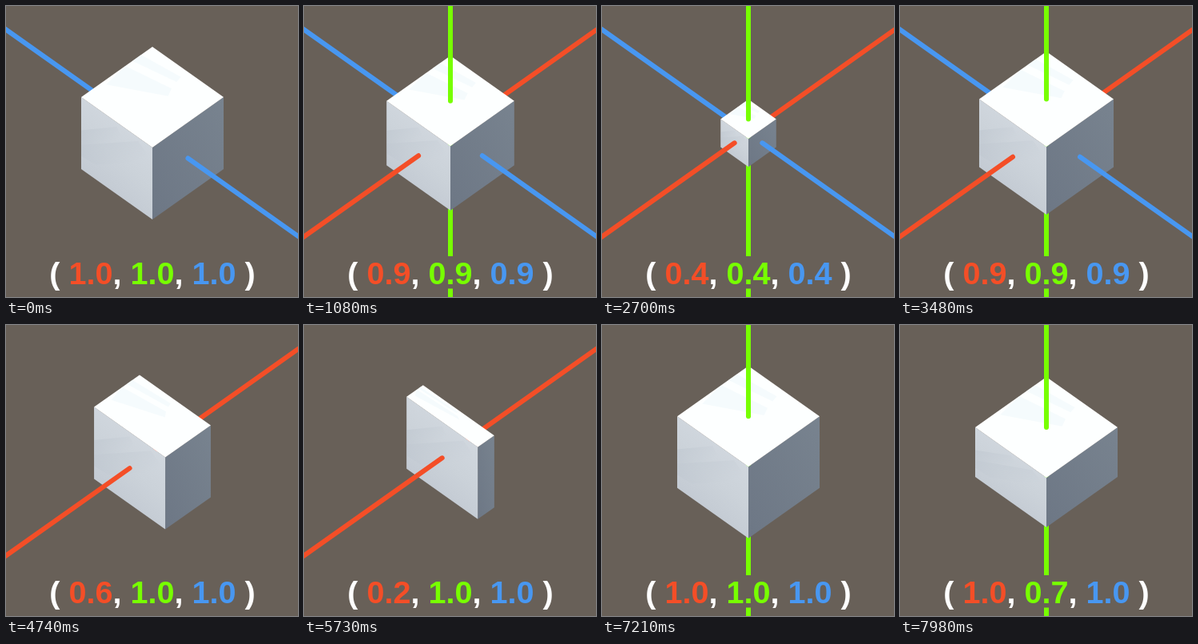
Recreate the animation shown at these times as an HTML page. Size 365x364 px, loop 8 s.

```html
<!DOCTYPE html>
<html lang="en">
<head>
<meta charset="utf-8">
<title>Scale vector</title>
<style>
html, body { margin: 0; width: 100%; height: 100%; overflow: hidden; background: #686058; }
svg { display: block; width: 100%; height: 100%; }
text { font: bold 39.6px "Liberation Sans", Arial, sans-serif; fill: #fff; text-anchor: middle; }
.axis { fill: none; stroke-width: 6; stroke-linecap: round; }
.red { stroke: #f44e27; }
.green { stroke: #77ff00; }
.blue { stroke: #4897f1; }
</style>
</head>
<body>
<svg viewBox="0 0 365 364">
  <defs>
    <linearGradient id="leftFill" x1="0.75" y1="0" x2="0.25" y2="1">
      <stop offset="0" stop-color="#d5dbe2"/>
      <stop offset="0.5" stop-color="#cbd2d9"/>
      <stop offset="1" stop-color="#bdc4ce"/>
    </linearGradient>
    <linearGradient id="rightFill" x1="0" y1="1" x2="1" y2="0">
      <stop offset="0" stop-color="#6d7785"/>
      <stop offset="1" stop-color="#78838f"/>
    </linearGradient>
    <linearGradient id="shade" x1="0" y1="0" x2="0.7" y2="0.5">
      <stop offset="0" stop-color="#a9b3bf" stop-opacity="0.4"/>
      <stop offset="1" stop-color="#a9b3bf" stop-opacity="0"/>
    </linearGradient>
  </defs>
  <rect width="365" height="364" fill="#686058"/>
  <path id="backX" class="axis red"/>
  <path id="backY" class="axis green"/>
  <path id="backZ" class="axis blue"/>
  <path id="rightFace" fill="url(#rightFill)"/>
  <path id="leftFace" fill="url(#leftFill)"/>
  <g id="leftSheen" fill="url(#shade)">
    <path d="M0 .46L.5 .06L.6 .2L0 .66Z"/>
    <path d="M0 .66L.8 .05L1 .2L.2 .8L0 .82Z"/>
  </g>
  <path id="topFace" fill="#fdffff"/>
  <g id="topSheen" fill="#eef8fb" fill-opacity="0.55">
    <path d="M.3 .05L.62 0L.72 .55L.62 .6Z"/>
    <path d="M.72 0L.84 0L.9 .5L.82 .52Z"/>
  </g>
  <path id="frontX" class="axis red"/>
  <path id="frontY" class="axis green"/>
  <path id="frontZ" class="axis blue"/>
  <rect x="50" y="313" width="266" height="40.5" fill="#686058"/>
  <text x="183" y="348">( <tspan id="textX" fill="#f44e27"></tspan>, <tspan id="textY" fill="#77ff00"></tspan>, <tspan id="textZ" fill="#4897f1"></tspan> )</text>
</svg>
<script>
const LOOP = 8000, START = 590, CYCLE = 3290, MIDDLE = 1623, STEP = 70.35;
const CENTER = [183, 159];
const AXES = { X: [-44.5, 31.5], Y: [0, -45], Z: [44.5, 31.5] };
const PHASES = ['XYZ', 'X', 'Y'];
const names = Object.keys(AXES);
const el = id => document.getElementById(id);

// Screen position of a point given in half-edge units
const at = (...p) => CENTER.map((c, i) =>
  c + names.reduce((sum, n, k) => sum + AXES[n][i] * p[k], 0));
const path = (id, pts, close = '') =>
  el(id).setAttribute('d', 'M' + pts.map(p => p.map(v => v.toFixed(2)).join(' ')).join('L') + close);

// Maps the unit square onto a face: corner, end of u, end of v
function mapFace(id, o, u, v) {
  const m = [u[0] - o[0], u[1] - o[1], v[0] - o[0], v[1] - o[1], ...o];
  el(id).setAttribute('transform', `matrix(${m.join(' ')})`);
}

function stateAt(ms) {
  if (ms < START) return { shown: 'Z', scale: 1 };
  const t = Math.floor((ms - START) / STEP + 0.1) * STEP;
  const k = Math.floor(t / CYCLE);
  const d = Math.abs(t - k * CYCLE - MIDDLE);
  return { shown: PHASES[k], scale: 1 - 0.8 * Math.exp(-Math.pow(d / 839, 2.4)) };
}

function draw(ms) {
  const { shown, scale } = stateAt(ms);
  const size = names.map(n => shown !== 'Z' && shown.includes(n) ? scale : 1);
  const [x, y, z] = size;

  const top = [at(x, y, -z), at(-x, y, -z), at(-x, y, z), at(x, y, z)];
  const left = [top[0], top[3], at(x, -y, z), at(x, -y, -z)];
  const right = [top[3], top[2], at(-x, -y, z), at(x, -y, z)];
  path('topFace', top, 'Z');
  path('leftFace', left, 'Z');
  path('rightFace', right, 'Z');
  mapFace('leftSheen', left[0], left[1], left[3]);
  mapFace('topSheen', top[0], top[1], top[3]);

  names.forEach((n, k) => {
    const point = v => at(...names.map((_, i) => i === k ? v : 0));
    const visible = shown.includes(n) ? 'visible' : 'hidden';
    path('back' + n, [point(-6), CENTER]);
    path('front' + n, [point(6), point(size[k])]);
    el('back' + n).setAttribute('visibility', visible);
    el('front' + n).setAttribute('visibility', visible);
    el('text' + n).textContent = size[k].toFixed(1);
  });
}

const begin = performance.now();
function tick() {
  draw((performance.now() - begin) % LOOP);
  requestAnimationFrame(tick);
}
tick();
</script>
</body>
</html>
```
